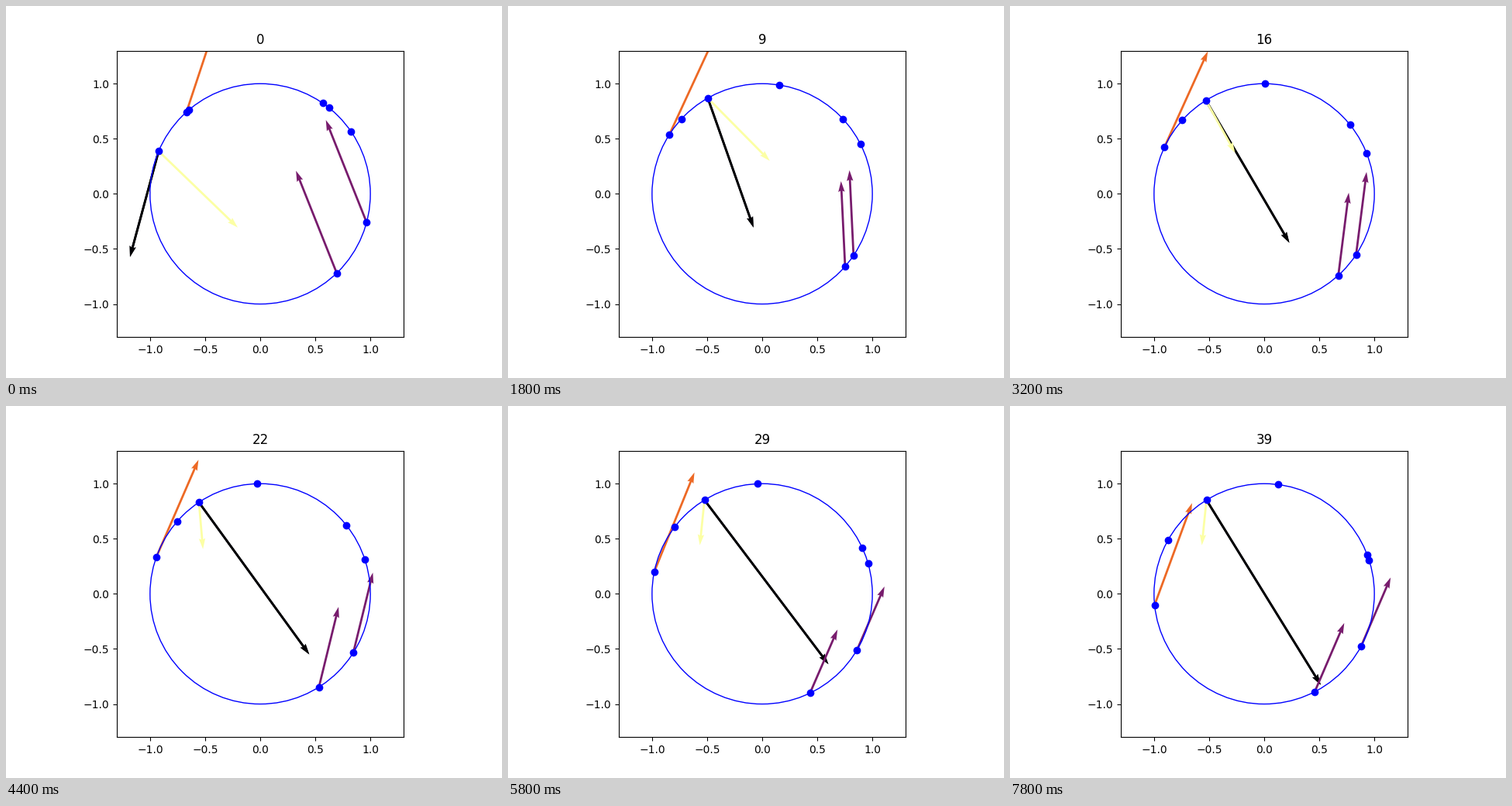
These frames come from a looping animation (640x480 px, 8 s). A matplotlib script:

```python
import numpy as np
import matplotlib.pyplot as plt
from matplotlib.animation import FuncAnimation

STEPS, INTERVAL = 40, 200


def smooth(steps, values):
    """Monotone cubic through the turning points, holding the last value."""
    x, y = np.array(steps, float), np.array(values)
    h = np.diff(x)
    d = np.diff(y) / h
    a, b = d[:-1], d[1:]
    inner = np.where(a * b > 0, 2 * a * b / (a + b + 1e-12), 0)
    m = np.concatenate([d[:1], inner, d[-1:]])
    t = np.arange(STEPS)
    i = np.clip(np.searchsorted(x, t, "right") - 1, 0, len(h) - 1)
    s = np.minimum((t - x[i]) / h[i], 1)
    ease = s * s * (3 - 2 * s)
    bend = s * (1 - s) * h[i] * ((1 - s) * m[i] - s * m[i + 1])
    return y[i] + (y[i + 1] - y[i]) * ease + bend


def entity(turns):
    """Path on the unit circle from {step: angle in degrees}."""
    a = np.radians(smooth(list(turns), list(turns.values())))
    return np.column_stack([np.cos(a), np.sin(a)])


def relation(turns):
    """Vector over time from {step: u + vj}."""
    steps, z = list(turns), np.array(list(turns.values()))
    return np.column_stack([smooth(steps, z.real), smooth(steps, z.imag)])


hub = entity({0: 157.2, 9: 119.6, 22: 123.8, 29: 121.6})
west = entity({0: 132, 9: 147.4, 28: 167, 39: 185.8})
southeast = entity({0: -15, 9: -34, 39: -28.4})
south = entity({0: -46, 5: -48.2, 9: -41.2, 29: -64.3, 39: -62.7})
others = [
    entity({0: 130.2, 9: 137.2, 22: 138.9, 39: 150.8}),
    entity({0: 55.5, 14: 89, 29: 92.4, 39: 82.7}),
    entity({0: 51.3, 16: 38.8, 22: 38.5, 29: 24.7, 39: 20.8}),
    entity({0: 34.5, 18: 20.3, 29: 16.1, 39: 17.6}),
]
entities = [hub, west, southeast, south] + others

# each relation with the entities it starts from; a repeated head draws twice
relations = [
    (relation({0: -.26 - .96j, 9: .415 - 1.175j, 29: 1.125 - 1.49j,
               39: 1.037 - 1.678j}), [hub, hub]),
    (relation({0: -.37 + .929j, 9: -.037 + .774j, 22: .178 + .728j,
               29: .25 + .577j, 39: .268 + .624j}), [south, southeast]),
    (relation({0: .314 + .949j, 9: .4 + .864j, 39: .34 + .925j}), [west]),
    (relation({0: .718 - .693j, 9: .563 - .57j, 22: .037 - .425j,
               29: -.042 - .41j}), [hub]),
]
colors = plt.get_cmap("inferno")(np.linspace(0, 1, len(relations)))

fig, ax = plt.subplots(figsize=(6.4, 4.8), dpi=100)


def draw(step):
    ax.clear()
    ax.set(xlim=(-1.3, 1.3), ylim=(-1.3, 1.3), aspect="equal")
    ax.set_title(str(step))
    for (vector, heads), color in zip(relations, colors):
        for head in heads:
            ax.quiver(*head[step], *vector[step], color=color,
                      angles="xy", scale_units="xy", scale=1)
    ax.add_patch(plt.Circle((0, 0), 1, fill=False, color="blue"))
    ax.plot(*np.transpose([e[step] for e in entities]), "o", color="blue")
    ax.set(xlim=(-1.3, 1.3), ylim=(-1.3, 1.3))


anim = FuncAnimation(fig, draw, frames=STEPS, interval=INTERVAL,
                     init_func=lambda: None, repeat=True, repeat_delay=0)
plt.show()
```
